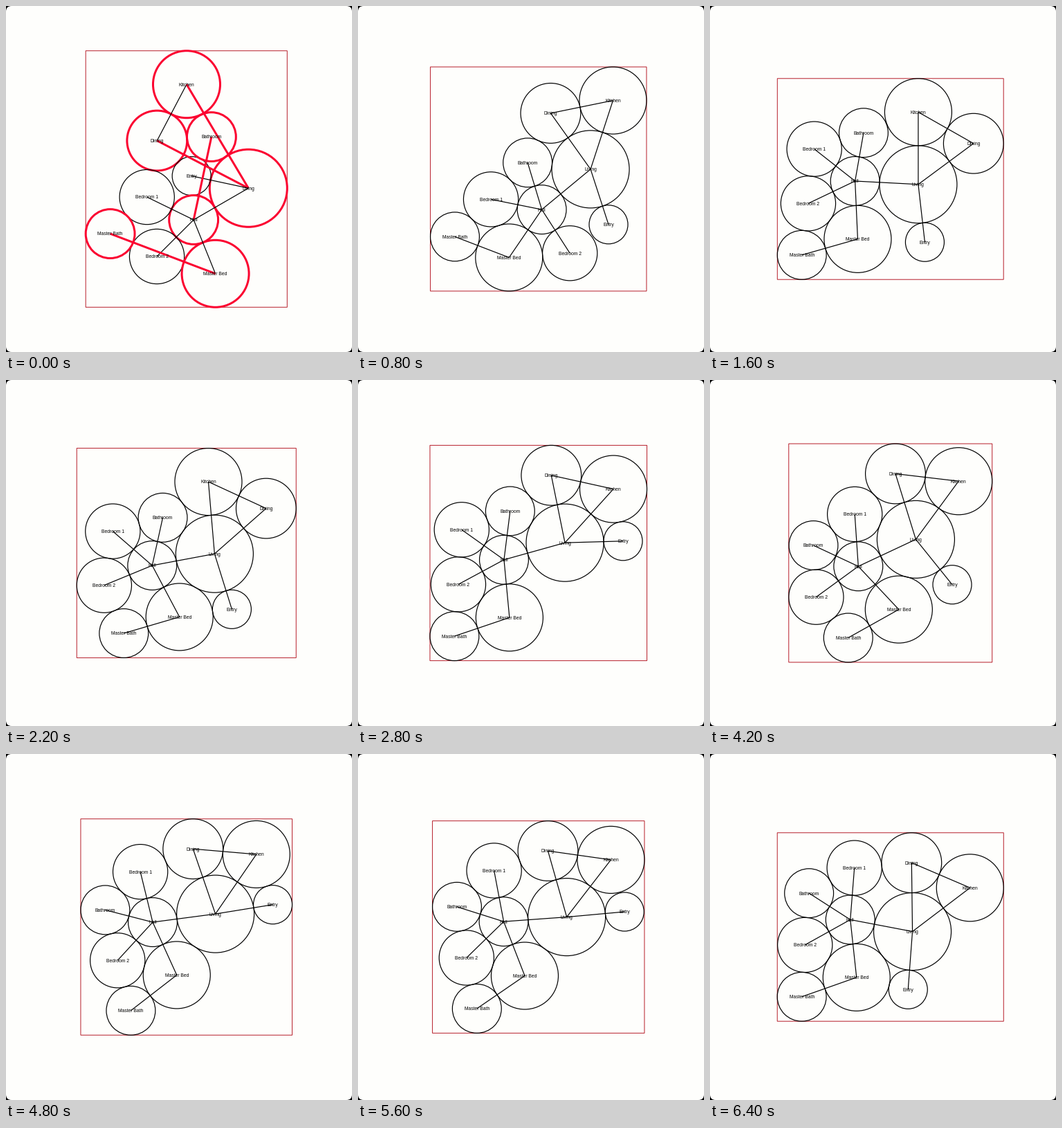
A matplotlib script for the animation above (6.8 s loop, 500 px wide and 500 px high).

```python
import numpy as np
import matplotlib.pyplot as plt
from matplotlib.animation import FuncAnimation
from matplotlib.patches import Circle, FancyBboxPatch, Rectangle

SIZE = 500
PX = 0.72  # points per pixel at 100 dpi
PAPER, INK, RED, FRAME = "#fefefc", "#000000", "#fb0330", "#b8202c"
CENTER = np.array([260.75, 250])
STEPS = 33

ROOMS = {
    "Kitchen": 150, "Dining": 120, "Living": 200, "Entry": 50, "Hall": 80,
    "Bathroom": 80, "Bedroom 1": 100, "Bedroom 2": 100,
    "Master Bed": 150, "Master Bath": 80,
}
CODES = "KDLEHBRSMW"  # one letter per room, in the order above
RADII = 3.96 * np.sqrt(np.array(list(ROOMS.values()), float))
REACH = RADII[:, None] + RADII[None, :]
LINKS = [(CODES.index(a), CODES.index(b))
         for a, b in "DK DL KL LE HL HB HR HS HM MW".split()]
ADJACENT = np.zeros((10, 10), bool)
for a, b in LINKS:
    ADJACENT[a, b] = ADJACENT[b, a] = True

# Recipes for packings around the hall. "LH-30" puts L against H at -30
# degrees; "ELH" puts E against both, on the right hand walking from L to H.
PLANS = {
    0: "LH-30 ELH BLE DBE KBD RH206 MH68 SHM WRS",
    4: "LH-39.6 BLH DLB KLD EL72 RBH MRH SMH WRM",
    8: "LH3 BH-80 RBH SRH MSH WSM KL-90 DLK EL83.5",
    14: "LH-15.6 BLH RBH SRH MSH WSM DLB KLD ELK",
    18: "SH-70.6 KHS EHK LEK DHE BHD MDL RSB WM160.5",
    24: "LH-7.5 MHL SHM BHS RHB DLR KLD ELK WSM",
    32: "LH10.8 MHL SHM BHS RHB DLR KLD EML WSM",
}


def bounds(p):
    r = RADII[:, None]
    return (p - r).min(axis=-2), (p + r).max(axis=-2)


def centered(p):
    lo, hi = bounds(p)
    return p + CENTER - (lo + hi) / 2


def build(plan):
    p = np.zeros((10, 2))
    for word in plan.split():
        room, a = CODES.index(word[0]), CODES.index(word[1])
        if word[2].isalpha():
            b = CODES.index(word[2])
            gap = np.hypot(*(p[b] - p[a]))
            u = (p[b] - p[a]) / gap
            along = (REACH[room, a]**2 - REACH[room, b]**2 + gap**2) / (2 * gap)
            aside = np.sqrt(max(REACH[room, a]**2 - along**2, 0))
            p[room] = p[a] + along * u + aside * np.array([-u[1], u[0]])
        else:
            turn = np.radians(float(word[2:]))
            p[room] = p[a] + REACH[room, a] * np.array([np.cos(turn),
                                                        np.sin(turn)])
    return centered(p)


def relax(p, rounds=260):
    """Pull linked rooms together and push overlapping ones apart."""
    off_diagonal = ~np.eye(10, dtype=bool)
    for i in range(rounds):
        cap = max(1, 60 * (1 - i / (0.7 * rounds)))
        diff = p[:, None, :, :] - p[:, :, None, :]
        dist = np.sqrt((diff ** 2).sum(-1)) + 1e-6
        gap = dist - REACH
        force = 0.08 * np.clip(gap, 0, cap) * ADJACENT
        force += 0.3 * np.minimum(gap, 0) * off_diagonal
        p = p + ((force / dist)[..., None] * diff).sum(2)
        p -= 0.0002 * cap * (p - p.mean(1, keepdims=True))
    return p


def broken_links(p):
    return [np.hypot(*(p[a] - p[b])) > REACH[a, b] + 5 for a, b in LINKS]


def choose(step, options):
    """Pick the packing that fits a plan size shrinking with time."""
    limit = np.array([323, 380 - 2.9 * step])

    def cost(p):
        lo, hi = bounds(p)
        total = 3 * np.maximum(hi - lo - limit, 0).sum()
        if step % 9:
            total += 15 * sum(broken_links(p))
        return total

    return min(options, key=cost)


def make_layouts(tries=14):
    rng = np.random.default_rng(7)
    layouts = {step: build(plan) for step, plan in PLANS.items()}
    free = [s for s in range(STEPS) if s not in PLANS]
    starts = []
    for s in free:
        near = (max(k for k in PLANS if k < s), min(k for k in PLANS if k > s))
        for _ in range(tries):
            starts.append(layouts[rng.choice(near)] + rng.normal(0, 45, (10, 2)))
    packed = relax(np.array(starts)).reshape(len(free), tries, 10, 2)
    for s, options in zip(free, packed):
        layouts[s] = centered(choose(s, options))
    return layouts


layouts = make_layouts()

fig = plt.figure(figsize=(5, 5), dpi=100, facecolor="black")
ax = fig.add_axes([0, 0, 1, 1])
ax.set_xlim(0, SIZE)
ax.set_ylim(SIZE, 0)
ax.axis("off")
ax.add_patch(FancyBboxPatch((0, 0), SIZE, SIZE, fc=PAPER, ec="none",
                            boxstyle="round,pad=0,rounding_size=8"))

border = ax.add_patch(Rectangle((0, 0), 1, 1, fill=False, ec=FRAME, lw=PX,
                                snap=False))
circles = [ax.add_patch(Circle((0, 0), r, fill=False, zorder=2))
           for r in RADII]
lines = [ax.plot([], [], solid_capstyle="butt", snap=False, zorder=3)[0]
         for _ in LINKS]
labels = [ax.text(0, 0, name, family="Liberation Sans", size=6.8 * PX,
                  color=INK, ha="center", va="baseline", zorder=4)
          for name in ROOMS]


def draw(i):
    p = layouts[min(i, STEPS - 1)]
    lo, hi = bounds(p)
    border.set_bounds(*lo, *(hi - lo))

    marked, outgoing = set(), [0] * len(ROOMS)
    for (a, b), line, bad in zip(LINKS, lines, broken_links(p)):
        line.set_data(p[[a, b], 0], p[[a, b], 1])
        line.set_color(RED if bad else INK)
        line.set_linewidth((3 if bad else 1.2) * PX)
        if bad:
            marked.update((a, b))
            outgoing[a] += 1

    # A room's outline thickens with the broken links that start there
    for n, (circle, label) in enumerate(zip(circles, labels)):
        x, y = p[n]
        bad = n in marked
        width = 1.5 + 1.5 * max(outgoing[n], 1) if bad else 1.2
        circle.center = x, y
        circle.set_edgecolor(RED if bad else INK)
        circle.set_linewidth(width * PX)
        label.set_position((x, y + 2.4))
    return [border, *circles, *lines, *labels]


anim = FuncAnimation(fig, draw, frames=STEPS + 1, interval=200,
                     repeat=True, repeat_delay=0)
plt.show()
```
